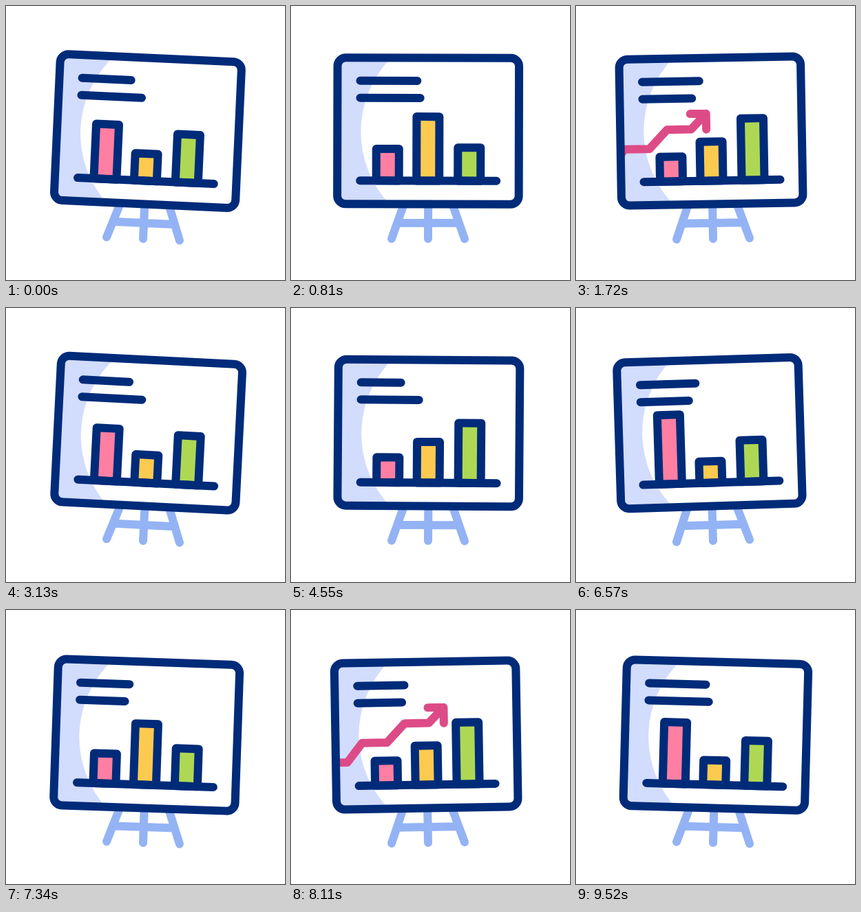
An HTML page that plays this animation: 405 px wide and 399 px high, repeating every 9.59 s.

```html
<!DOCTYPE html>
<html lang="en">
<head>
<meta charset="utf-8">
<title>Presentation board</title>
<style>
  html, body { margin: 0; width: 100%; height: 100%; overflow: hidden; background: #fff; }
  svg { display: block; width: 100%; height: 100%; }
  path, #frame { stroke-width: 12; stroke-linecap: round; stroke-linejoin: round; }
  .navy { stroke: #002b79; }
</style>
</head>
<body>
<svg viewBox="0 0 405 399" fill="none">
  <clipPath id="inside"><rect x="67" y="75.5" width="264" height="213" rx="12"/></clipPath>
  <g id="board">
    <path stroke="#94b3f4" d="M165 285L146 339M233 285L252 339M199 285V339M155 316H243"/>
    <g clip-path="url(#inside)">
      <rect x="60" y="70" width="280" height="224" fill="#d2dcfd"/>
      <circle cx="255" cy="183" r="154" fill="#fff"/>
    </g>
    <path class="navy" id="text"/>
    <path class="navy" id="pink" fill="#ff7fa3"/>
    <path class="navy" id="yellow" fill="#fdca50"/>
    <path class="navy" id="green" fill="#aed853"/>
    <path class="navy" d="M100 254.5H298"/>
    <g clip-path="url(#inside)">
      <path id="arrow" stroke="#dd4b87"
        d="M-176 78H-141L-119 50H-83L-57 22.500H-22L0 0M-23 0H0V23"/>
    </g>
    <rect id="frame" class="navy" x="67" y="75.5" width="263.500" height="213" rx="12"/>
  </g>
</svg>
<script>
const LOOP = 9590, CYCLE = 3150, STEP = CYCLE / 5, OFFSET = 185, TURN = 2 * Math.PI;
const $ = id => document.getElementById(id);
const set = (id, name, value) => $(id).setAttribute(name, value);
const wrap = t => (t + CYCLE) % CYCLE;
const ease = p => (1 - Math.cos(Math.PI * Math.min(1, Math.max(0, p)))) / 2;

// Eases through evenly spaced poses, then back to the first one.
function pose(time, ...values) {
  const i = Math.floor(time / STEP);
  const from = values[i], to = values[(i + 1) % values.length];
  return from + (to - from) * ease(time / STEP - i);
}

// Four waves per cycle, running a little faster around its first third.
const phase = t => 4 * TURN * t / CYCLE + 0.45 * Math.sin(TURN * (t / CYCLE - 1 / 3));
const wave = (t, peak) => Math.cos(phase(t) - phase(peak));

function bar(id, time, x, rest, first, second) {
  const h = pose(time, rest, first, second, rest, rest);
  set(id, 'd', `M${x} 254.5v${-h}h33v${h}z`);
}

function draw() {
  const t = (performance.now() % LOOP + OFFSET) % CYCLE;
  set('board', 'transform', `rotate(${pose(t, 4, -3, 2, -1, 0)} 199 339.5)`);
  set('text', 'd', `M100 109h${65 + 24 * wave(t, 350)}M100 134h${75 + 13 * wave(t, 215)}`);

  const barTime = wrap(t + 200);
  bar('pink', barTime, 123.5, 36, 101, 45);
  bar('yellow', barTime, 182, 57, 31, 95);
  bar('green', barTime, 242, 90, 60.5, 48);

  // The arrow climbs in from the left, rests, and leaves on the right.
  const arrowTime = wrap(t - 1500);
  const x = 56 + 189 * ease(arrowTime / STEP) + 284 * ease((arrowTime - 1000) / STEP);
  set('arrow', 'transform', `translate(${x} ${241 - 0.44 * x})`);
  requestAnimationFrame(draw);
}
draw();
</script>
</body>
</html>
```
